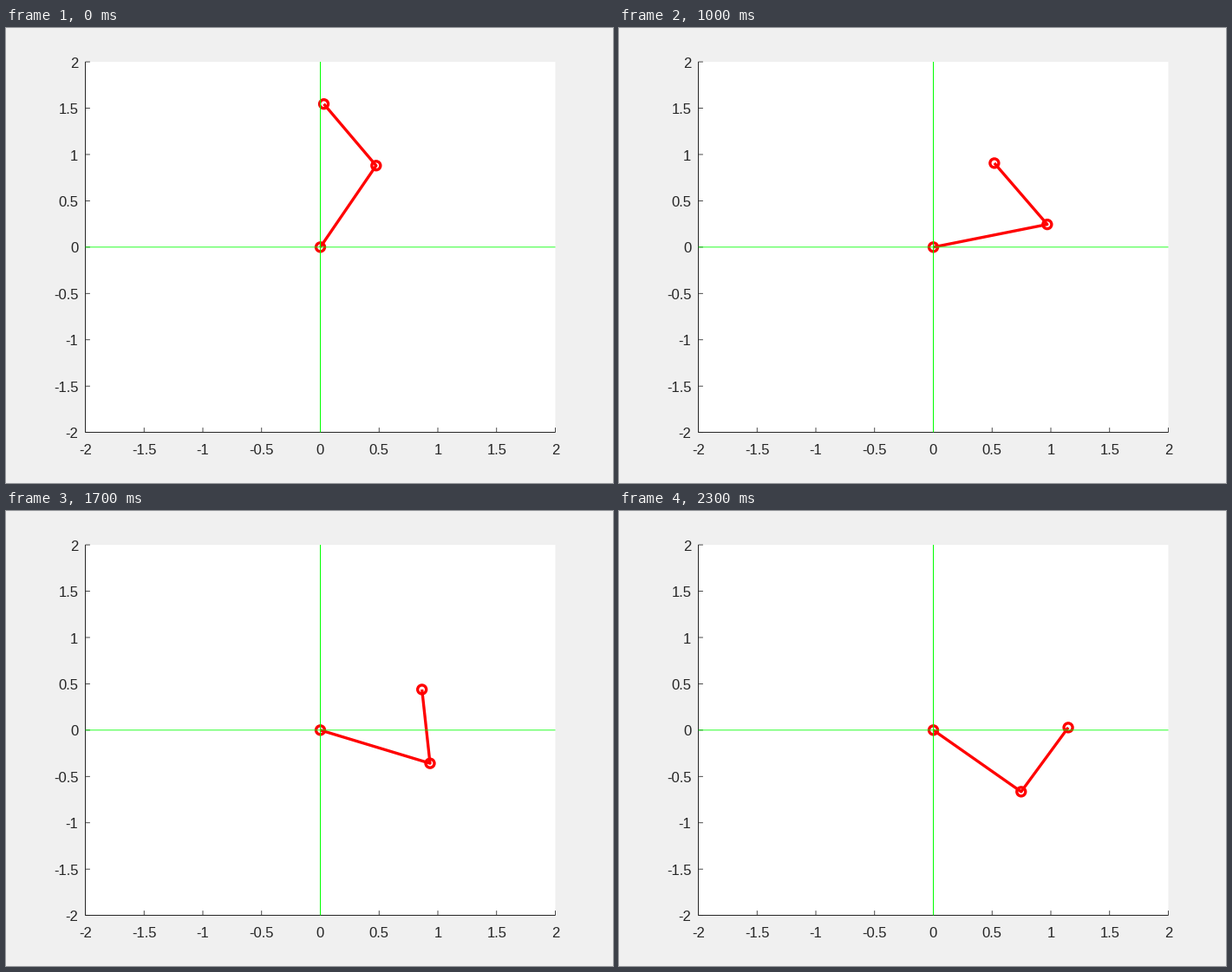
A matplotlib script that plays this animation: 700x525 px, repeating every 2400 ms.

```python
import numpy as np
import matplotlib.pyplot as plt
from matplotlib.animation import FuncAnimation
from matplotlib.patches import Circle, Rectangle

W, H, DPI = 700, 525, 100
FRAMES, INTERVAL = 24, 100
L1, L2 = 1.0, 0.8
CENTER = np.array([362.5, 252.85])
SCALE = np.array([135.5, -106.9])
PT = 72 / DPI
THIN, THICK = 0.83 * PT, 3.33 * PT
INK, RED, GREEN = "#262626", "#ff0000", "#00ff00"

plt.rcParams["font.family"] = "Liberation Sans"
fig = plt.figure(figsize=(W / DPI, H / DPI), dpi=DPI, facecolor="#f0f0f0")
ax = fig.add_axes([0, 0, 1, 1])
ax.set_xlim(0, W)
ax.set_ylim(H, 0)
ax.axis("off")


def to_px(x, y):
    return CENTER + SCALE * np.array([x, y])


def line(xs, ys, color, width, z):
    return ax.plot(xs, ys, color=color, lw=width, zorder=z, snap=False,
                   solid_capstyle="butt", solid_joinstyle="round")[0]


def draw_axes():
    left, bottom = 91.5, 466.5
    right, top = to_px(2, 2)
    ax.add_patch(Rectangle((left, top), right - left, bottom - top,
                           fc="white", ec="none", zorder=0, snap=False))
    line([left, right], [bottom, bottom], INK, PT, 1)
    line([left, left], [top, bottom], INK, PT, 1)
    for v in np.arange(-2, 2.5, 0.5):
        x, y = to_px(v, v)
        line([x, x], [bottom, bottom - 5.4], INK, THIN, 1)
        line([left, left + 5.4], [y, y], INK, THIN, 1)
        label = f"{v:g}"
        ax.text(x, 492, label, size=12, color=INK, ha="center", va="baseline")
        ax.text(83.4, y + 6.6, label, size=12, color=INK, ha="right", va="baseline")
    cx, cy = CENTER
    line([left, right], [cy, cy], GREEN, THIN, 5)
    line([cx, cx], [top, bottom], GREEN, PT, 5)


def tip_at(s):
    """Nearly straight path of the arm's tip, s from 0 to 1."""
    bow = s * (1 - s)
    x = 0.03 + 1.118 * s + bow * (0.1 * s - 0.03)
    y = 1.545 - 1.517 * s + bow * (0.1 - 0.03 * s)
    return x, y


def elbow_for(x, y):
    """Inverse kinematics, elbow on the clockwise side."""
    r = np.hypot(x, y)
    bend = np.arccos((r**2 + L1**2 - L2**2) / (2 * r * L1))
    a = np.arctan2(y, x) - bend
    return L1 * np.cos(a), L1 * np.sin(a)


draw_axes()
arm = line([], [], RED, THICK, 3)
joints = [ax.add_patch(Circle(CENTER, 5, fill=False, ec=RED, lw=THICK,
                              zorder=3, snap=False)) for _ in range(3)]


def update(i):
    tip = tip_at(i / (FRAMES - 1))
    points = [to_px(0, 0), to_px(*elbow_for(*tip)), to_px(*tip)]
    arm.set_data(*zip(*points))
    for joint, p in zip(joints, points):
        joint.center = p
    return [arm, *joints]


anim = FuncAnimation(fig, update, frames=FRAMES, interval=INTERVAL,
                     repeat=True, repeat_delay=0, blit=False)
plt.show()
```
